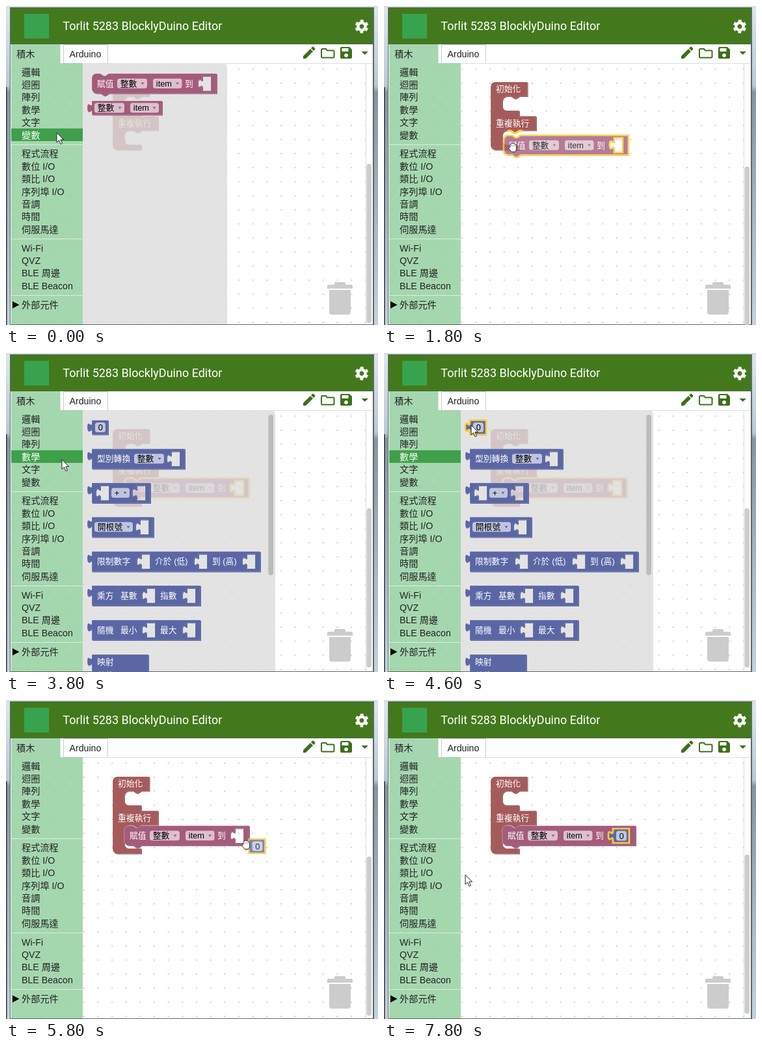
Write an HTML page that moves like this. It is 572 px wide and 491 px high and loops after 8000 ms.

```html
<!DOCTYPE html>
<html lang="zh-Hant">
<head>
<meta charset="utf-8">
<title>Block editor</title>
<style>
  html, body { margin: 0; width: 100%; height: 100%; overflow: hidden; background: #fff; }
  svg { display: block; width: 572px; height: 491px; }
  text { font-family: "Liberation Sans", "Noto Sans CJK TC", "Noto Sans CJK JP", "Noto Sans CJK", sans-serif; font-size: 12.8px; white-space: pre; }
  .title { font: 400 18px Roboto, sans-serif; }
  .menu text, .tab { font-size: 14.2px; fill: #222; }
  .menu text.on { fill: #fff; }
  .body { fill-rule: evenodd; stroke: rgba(255,255,255,.28); stroke-width: .8; }
  .shade { fill-rule: evenodd; }
  .selected > .body { stroke: #fc3; stroke-width: 2.7; }
  .drag { opacity: .8; }
</style>
</head>
<body>
<svg id="stage" viewBox="0 0 572 491">
  <defs>
    <pattern id="dots" x="130.600" y="86.500" width="21.65" height="21.65" patternUnits="userSpaceOnUse">
      <rect x="10" y="10" width="1.8" height="1.4" fill="#b5b5b5"/>
    </pattern>
    <linearGradient id="edge" x2="0" y2="1">
      <stop offset="0" stop-color="#dce6ef"/><stop offset=".25" stop-color="#b9c8d6"/>
      <stop offset=".27" stop-color="#8795a3"/><stop offset="1" stop-color="#c3d2df"/>
    </linearGradient>
  </defs>
  <rect width="572" height="491" fill="url(#edge)"/>
  <rect width="572" height="3" fill="#d5dfe8"/>
  <rect y="125" width="1.5" height="366" fill="#3a3f45"/>
  <rect x="6" y="2" width="560" height="489" fill="#5b6a63"/>
  <rect x="7" y="59" width="557" height="431" fill="#fff"/>
  <rect x="8" y="89" width="545" height="401" fill="url(#dots)"/>
  <path d="M553.5 88V490M88 88.5H563" stroke="#ddd" fill="none"/>
  <rect id="thumb" x="554.5" width="7.5" height="245" rx="3.75" fill="#ccc"/>

  <g fill="#ccc">
    <path d="M505 429v-2q0-2 2-2h13q2 0 2 2v2h9q2 0 2 2v4h-39v-4q0-2 2-2z"/>
    <path d="M497 437h33v34q0 4-4 4h-25q-4 0-4-4z"/>
  </g>

  <g id="workspace"></g>
  <g id="varsFlyout"></g>
  <g id="mathFlyout"></g>

  <rect x="8" y="88" width="110" height="402" fill="#87ca94" opacity=".75"/>
  <rect id="rowMark" x="8" width="110" height="19.4"/>
  <g id="menu" class="menu"></g>
  <path d="M8 213.5H118M8 358.5H118M8 445.5H118" stroke="#d9eedd"/>
  <path d="M10 454.500l10.500 5.500-10.500 5.500z"/>

  <g id="floating"></g>

  <rect x="7" y="3" width="557" height="55.5" fill="#43791c"/>
  <rect x="28" y="12" width="38" height="38" fill="#37a34f"/>
  <text class="title" x="87.3" y="36.5" fill="#fff">Torlit 5283 BlocklyDuino Editor</text>
  <g transform="translate(547 31.5) rotate(90)" fill="none" stroke="#fff">
    <circle r="5.7" stroke-width="4.4"/>
    <circle r="8.6" stroke-width="3.6" stroke-dasharray="4.8 4.206" stroke-dashoffset="2.4"/>
  </g>
  <rect x="8" y="59" width="75.5" height="29" fill="#a5d6af"/>
  <path d="M88.5 88V59.5H156.5V88" fill="none" stroke="#ccc"/>
  <text class="tab" x="16" y="78.6">積木</text>
  <text class="tab" x="97.5" y="78.6">Arduino</text>
  <g fill="#3c7019">
    <path d="M457 81v-4l11-11 4 4-11 11zM469 65l2-2q1-1 2 0l2 2q1 1 0 2l-2 2z"/>
    <path d="M486 66h6l2 2.5h9q1.5 0 1.5 1.5v8q0 1.5-1.5 1.5h-16.5q-1.5 0-1.5-1.5v-10.5q0-1.5 1.5-1.5z" fill="none" stroke="#3c7019" stroke-width="2"/>
    <path fill-rule="evenodd" d="M516 63h12l4 4v12q0 2-2 2h-14q-2 0-2-2v-14q0-2 2-2zM516.5 65v5h10v-5zM523 73a3 3 0 1 0 .1 0z"/>
    <path d="M546.5 70h10.5l-5.25 5z"/>
  </g>

  <g id="arrow">
    <path d="M0 0V15l3.5-3.3 2.6 6 2.4-1-2.6-5.9h4.7z" fill="#fff" stroke="#222"/>
  </g>
  <g id="hand">
    <path d="M-4 5V2q0-2 2-2 1-1.5 2.500-.3Q2-1 3.200.7 5.500.5 5.500 3V8q0 2-1.500 4.500h-6Q-4 10-6 7.500-6.500 5-4 5z" fill="#fff" stroke="#333"/>
    <path d="M-1.500 1.500v2.500M1 1.500v2.500M3.300 2v2" stroke="#777" stroke-width=".8"/>
  </g>
</svg>
<script>
const $ = id => document.getElementById(id);
const STEP = 200, LOOP = 8000;
const RED = '#a55b5b', PLUM = '#a45b7c', BLUE = '#5b67a5';
const SHADE = { [RED]: '#844949', [PLUM]: '#834963', [BLUE]: '#495284' };

// Block outlines
const notchLeft = 'l-5.2 3.5h-2.6l-5.2-3.5';
const notchRight = 'l5.2 3.5h2.6l5.2-3.5';
const hole = (x, w = 13, h = 22.5) =>
  `M${x} 4v4.3c0 8.7-7-7-7 6.5s7-2.2 7 6.5V${4 + h}h${w}V4z`;
const valuePath = (w, h, holes = []) =>
  `M0 0H${w}V${h}H0V17.3c0-8.7-7 7-7-6.5s7 2.2 7-6.5z` + holes.map(x => hole(x)).join('');
const setPath = (w, holeWidth) =>
  `M0 7a7 7 0 0 1 7-7H13${notchRight}H${w}V30.5H26${notchLeft}H7a7 7 0 0 1-7-7z` + hole(170, holeWidth);
const mouth = h => `H44${notchLeft}h-6a7 7 0 0 0-7 7v${h - 14}a7 7 0 0 0 7 7H44`;
const programPath = h =>
  `M0 7a7 7 0 0 1 7-7H56.5V22${mouth(22)}V52.5H70V74.5${mouth(h)}v8H7a7 7 0 0 1-7-7z`;

const label = (x, y, s, fill = '#fff') => `<text x="${x}" y="${y + 4.6}" fill="${fill}">${s}</text>`;
const field = (x, w, s, color, y = 15.3, arrow = true) =>
  `<rect x="${x}" y="${y - 7.5}" width="${w}" height="15" rx="3.5" fill="#fff" opacity=".62"/>` +
  label(x + 4.8, y, s, '#000') +
  (arrow ? `<path d="M${x + w - 9.5} ${y - 1.5}h5l-2.5 3.5z" fill="${color}"/>` : '');
const block = (x, y, color, path, content, attrs = '') =>
  `<g transform="translate(${x} ${y})" ${attrs}>` +
  `<path class="shade" d="${path}" fill="${SHADE[color]}" transform="translate(1 1)"/>` +
  `<path class="body" d="${path}" fill="${color}"/>${content}</g>`;

const setContent = label(8, 15, '賦值') + field(39, 46, '整數', PLUM) +
  field(94, 44.5, 'item', PLUM) + label(143, 15, '到');
const zeroBlock = (x, y, attrs) =>
  block(x, y, BLUE, valuePath(25, 22), field(5, 16, '0', BLUE, 11, false), attrs);
const flyoutBack = right =>
  `<path d="M118 88H${right - 7}q7 0 7 7V490H118z" fill="#ddd" opacity=".82"/>`;
const math = (y, w, holes, content, h = 31) => block(132, y, BLUE, valuePath(w, h, holes), content);

const programLabels = label(8, 10.5, '初始化') + label(8, 63.5, '重複執行');
$('workspace').innerHTML =
  block(164, 117, RED, programPath(22), programLabels, 'id="shortProgram"') +
  block(164, 117, RED, programPath(36), programLabels, 'id="longProgram"');

$('floating').innerHTML =
  block(0, 0, PLUM, setPath(192, 13), setContent, 'id="setEmpty"') +
  block(0, 0, PLUM, setPath(205, 25), setContent, 'id="setFilled"') +
  zeroBlock(0, 0, 'id="zero" class="selected"') +
  `<path id="joint" d="M190 192h5${notchRight}h5" fill="none" stroke="#fc3" stroke-width="3"/>`;

$('varsFlyout').innerHTML = flyoutBack(340) +
  block(132, 104, PLUM, setPath(192, 13), setContent) +
  block(132, 146, PLUM, valuePath(108, 21.5),
    field(4, 46, '整數', PLUM, 10.8) + field(59, 44, 'item', PLUM, 10.8));

$('mathFlyout').innerHTML = flyoutBack(414) +
  '<rect x="403.5" y="95" width="7.5" height="247" rx="3.75" fill="#bbb"/>' +
  zeroBlock(132, 103.5, 'id="flyoutZero"') +
  math(147.5, 143, [122], label(8, 15, '型別轉換') + field(65, 46, '整數', BLUE)) +
  math(200, 90, [13, 69], field(30, 28, '+', BLUE)) +
  math(252.5, 95, [74], field(4, 59, '開根號', BLUE)) +
  math(305.5, 259, [76, 164, 238],
    label(8, 15, '限制數字') + label(97, 15, '介於 (低)') + label(185, 15, '到 (高)')) +
  math(358, 167, [84, 146], label(8, 15, '乘方') + label(44, 15, '基數') + label(105, 15, '指數')) +
  math(411, 167, [84, 146], label(8, 15, '隨機') + label(44, 15, '最小') + label(105, 15, '最大')) +
  math(464, 87, [], label(8, 11, '映射') + label(8, 32, '數值'), 60);

const groups = [
  [101, '邏輯 迴圈 陣列 數學 文字 變數'],
  [226.7, '程式流程 數位_I/O 類比_I/O 序列埠_I/O 音調 時間 伺服馬達'],
  [372, 'Wi-Fi QVZ BLE_周邊 BLE_Beacon'],
  [459.3, '外部元件']
];
const rows = groups.flatMap(([top, names]) =>
  names.split(' ').map((name, i) => ({ name: name.replace('_', ' '), y: top + i * 19.4 })));
$('menu').innerHTML = rows.map(r => `<text x="24" y="${r.y + 5.6}">${r.name}</text>`).join('');
const rowTexts = [...$('menu').children];

// time, x, y
const cursorKeys = [
  [0, 78, 195], [200, 78, 195], [800, 146, 117], [1000, 146, 117],
  [1800, 198, 212], [2200, 197, 211], [3400, 86, 164], [3800, 86, 164],
  [4600, 134, 111], [5000, 134, 111], [5800, 369, 217], [6200, 364, 216],
  [6800, 345, 249], [7200, 345, 249], [7800, 125, 269], [8000, 125, 269]
];

function cursorAt(t) {
  const i = Math.max(1, cursorKeys.findIndex(k => k[0] >= t));
  const [t0, x0, y0] = cursorKeys[i - 1], [t1, x1, y1] = cursorKeys[i];
  const p = (t - t0) / (t1 - t0);
  return [x0 + (x1 - x0) * p, y0 + (y1 - y0) * p];
}

const show = (id, on) => { $(id).style.display = on ? '' : 'none'; };
const place = (id, x, y) => $(id).setAttribute('transform', `translate(${x} ${y})`);

function render(t) {
  const [x, y] = cursorAt(t);
  const within = (a, b) => t >= a && t < b;
  const dragSet = within(1000, 2000), dragZero = within(5000, 6200);
  const docked = t >= 2000, filled = t >= 6200, scroll = t >= 5000 ? 1 : 0;
  const mathOpen = within(3800, 5000), varsOpen = t < 1000;

  show('varsFlyout', varsOpen);
  show('mathFlyout', mathOpen);
  show('shortProgram', !docked);
  show('longProgram', docked);
  place('workspace', 0, scroll);

  const setId = filled ? 'setFilled' : 'setEmpty';
  // Docked blocks lie under the flyout, dragged ones above everything
  const layer = dragSet ? $('floating') : $('workspace');
  const setX = docked ? 182 : x - 14, setY = docked ? 192.5 : y - 13;
  if ($(setId).parentNode !== layer) layer.appendChild($(setId));
  show('setEmpty', t >= 1000 && !filled);
  show('setFilled', filled);
  place(setId, setX, setY);
  $('setEmpty').setAttribute('class', (t < 5000 ? 'selected' : '') + (dragSet && t > 1000 ? ' drag' : ''));
  show('joint', dragSet && y > 200);

  show('zero', t >= 5000);
  place('zero', filled ? 352 : x + 4.5, filled ? 198 : y - 3);
  $('zero').setAttribute('class', 'selected' + (dragZero ? ' drag' : ''));
  $('flyoutZero').setAttribute('class', t >= 4600 ? 'selected' : '');

  const chosen = varsOpen ? 5 : mathOpen ? 3 : -1;
  const hovered = x < 118 ? rows.findIndex(r => Math.abs(r.y - y) < 9.7) : -1;
  const marked = chosen >= 0 ? chosen : hovered;
  show('rowMark', marked >= 0);
  if (marked >= 0) $('rowMark').setAttribute('y', rows[marked].y - 9.5);
  $('rowMark').setAttribute('fill', chosen >= 0 ? '#3f9f4a' : '#e6e8e6');
  rowTexts.forEach((el, i) => el.setAttribute('class', i === chosen ? 'on' : ''));

  const top = varsOpen ? 243 : !docked ? 247 : t < 5000 ? 239 : !filled ? 241 : 238;
  $('thumb').setAttribute('y', top);

  const grabbing = dragSet || dragZero;
  show('hand', grabbing);
  show('arrow', !grabbing);
  place(grabbing ? 'hand' : 'arrow', x, y);
}

let last = -1;
const start = performance.now();
function tick() {
  const elapsed = Math.max(0, performance.now() - start) % LOOP;
  const t = Math.floor(elapsed / STEP) * STEP;
  if (t !== last) render(last = t);
  requestAnimationFrame(tick);
}
tick();
</script>
</body>
</html>
```
